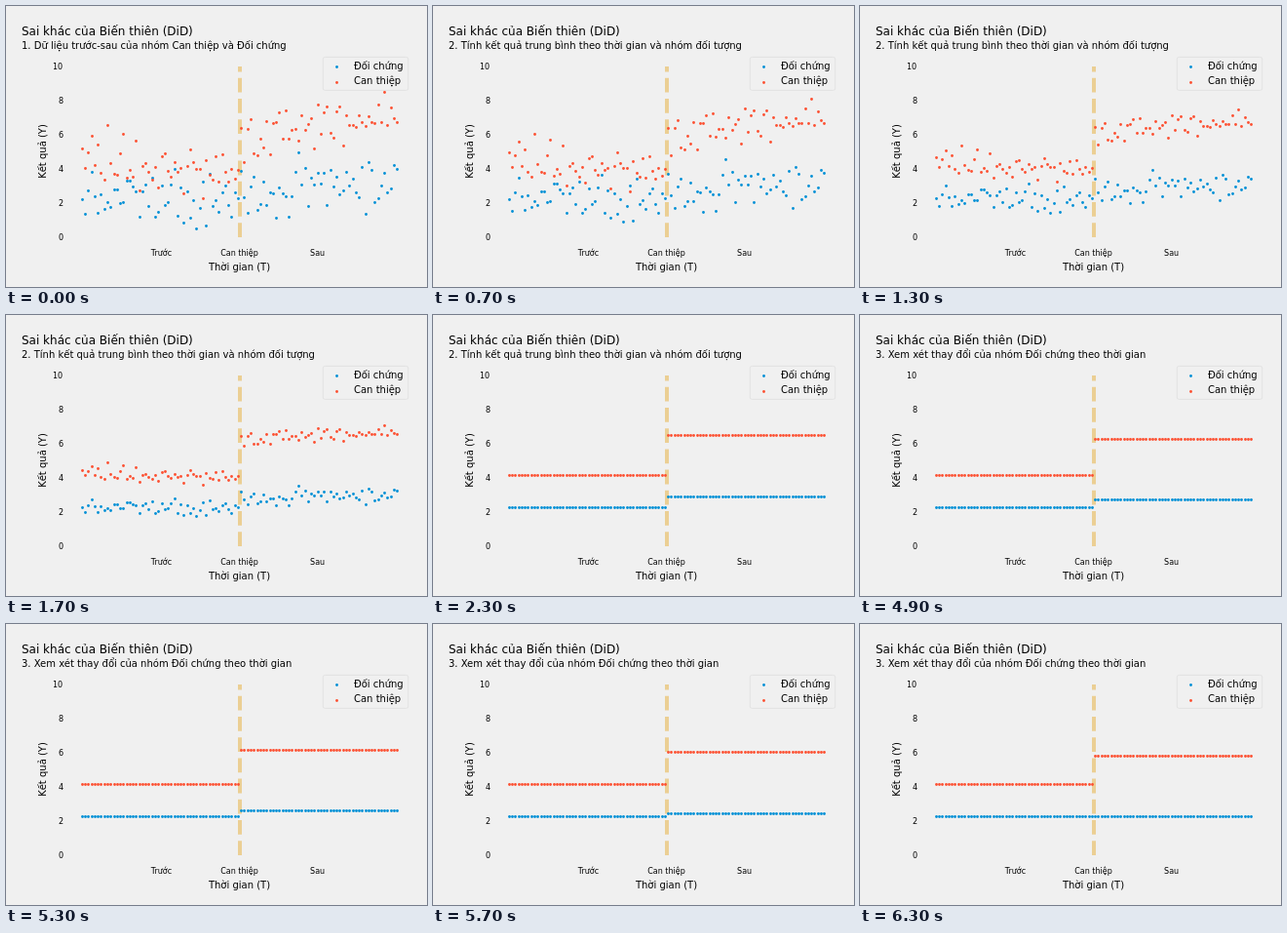
Recreate the animation shown at these times as an HTML page. Size 432x288 px, loop 8 s.

```html
<!DOCTYPE html>
<html lang="vi">
<head>
<meta charset="utf-8">
<title>DiD</title>
<style>
  html, body { margin: 0; width: 100%; height: 100%; overflow: hidden; background: #f0f0f0; }
  svg { display: block; width: 432px; height: 288px; font: 10px "DejaVu Sans", sans-serif; }
  .mid { text-anchor: middle; }
  .tick { font-size: 8px; }
  .control { fill: #008fd5; }
  .treated { fill: #fc4f30; }
</style>
</head>
<body>
<svg viewBox="0 0 432 288">
  <text x="16" y="30" font-size="12">Sai khác của Biến thiên (DiD)</text>
  <text id="step" x="16" y="44"></text>
  <text class="mid" x="239.5" y="271">Thời gian (T)</text>
  <text class="mid" transform="translate(41 149) rotate(-90)">Kết quả (Y)</text>
  <g id="ticks" class="tick"></g>
  <path d="M240 237V62" stroke="#e5ae38" stroke-opacity=".5" stroke-width="4" stroke-dasharray="14.8 6.4"/>
  <g id="dots"></g>
  <rect x="325.3" y="52.4" width="87.4" height="34" rx="2" fill="#f0f0f0" stroke="#ccc" stroke-opacity=".8" stroke-width=".5"/>
  <circle class="control" cx="339.5" cy="62.5" r="1.4"/>
  <circle class="treated" cx="339.5" cy="78.5" r="1.4"/>
  <text x="357" y="65">Đối chứng</text>
  <text x="357" y="80">Can thiệp</text>
</svg>
<script>
const $ = id => document.getElementById(id);
const snap = v => Math.floor(v) + 0.5;

function add(parent, tag, attrs, text = '') {
  const el = document.createElementNS('http://www.w3.org/2000/svg', tag);
  for (const k in attrs) el.setAttribute(k, attrs[k]);
  el.textContent = text;
  return parent.appendChild(el);
}

let seed = 7;
function random() {
  seed = (seed * 1664525 + 1013904223) % 2 ** 32;
  return seed / 2 ** 32;
}

const titles = [
  '1. Dữ liệu trước-sau của nhóm Can thiệp và Đối chứng',
  '2. Tính kết quả trung bình theo thời gian và nhóm đối tượng',
  '3. Xem xét thay đổi của nhóm Đối chứng theo thời gian'
];

// Each half of a group scatters around its mean height, with a slight slope.
const half = 50, trend = 11.2;
const clouds = [
  { name: 'control', late: false, mean: 197.54, slope: 0.2, spread: 38 },
  { name: 'control', late: true, mean: 186.34, slope: -0.1, spread: 38 },
  { name: 'treated', late: false, mean: 164.4, slope: 0.5, spread: 38 },
  { name: 'treated', late: true, mean: 123.83, slope: -0.5, spread: 32 }
];

const dots = clouds.flatMap(c => Array.from({ length: half }, (_, i) => ({
  ...c,
  offset: c.slope * (i - (half - 1) / 2) + c.spread * (random() + random() - 1),
  el: add($('dots'), 'circle', {
    class: c.name, r: 1.4, cx: snap(78.4 + 3.266 * (i + (c.late ? half : 0)))
  })
})));

for (let v = 0; v <= 10; v += 2)
  add($('ticks'), 'text', { x: 60 - 6 * String(v).length, y: 240 - 17.5 * v }, v);
['Trước', 'Can thiệp', 'Sau'].forEach((s, i) =>
  add($('ticks'), 'text', { class: 'mid', x: 159.4 + 80.1 * i, y: 256 }, s));

// Ten equal jumps, 200 ms apart, the first one at `start`.
const progress = (t, start) =>
  Math.min(10, Math.max(0, Math.floor((t - start) / 200) + 1)) / 10;

function draw(now) {
  const t = now % 8000;
  const gather = progress(t, 500), drop = progress(t, 4500);
  $('step').textContent = titles[(t >= 500) + (t >= 4500)];
  for (const d of dots) {
    const y = d.mean + d.offset * (1 - gather) + (d.late ? trend * drop : 0);
    d.el.setAttribute('cy', snap(y));
  }
  requestAnimationFrame(draw);
}
draw(0);
</script>
</body>
</html>
```
